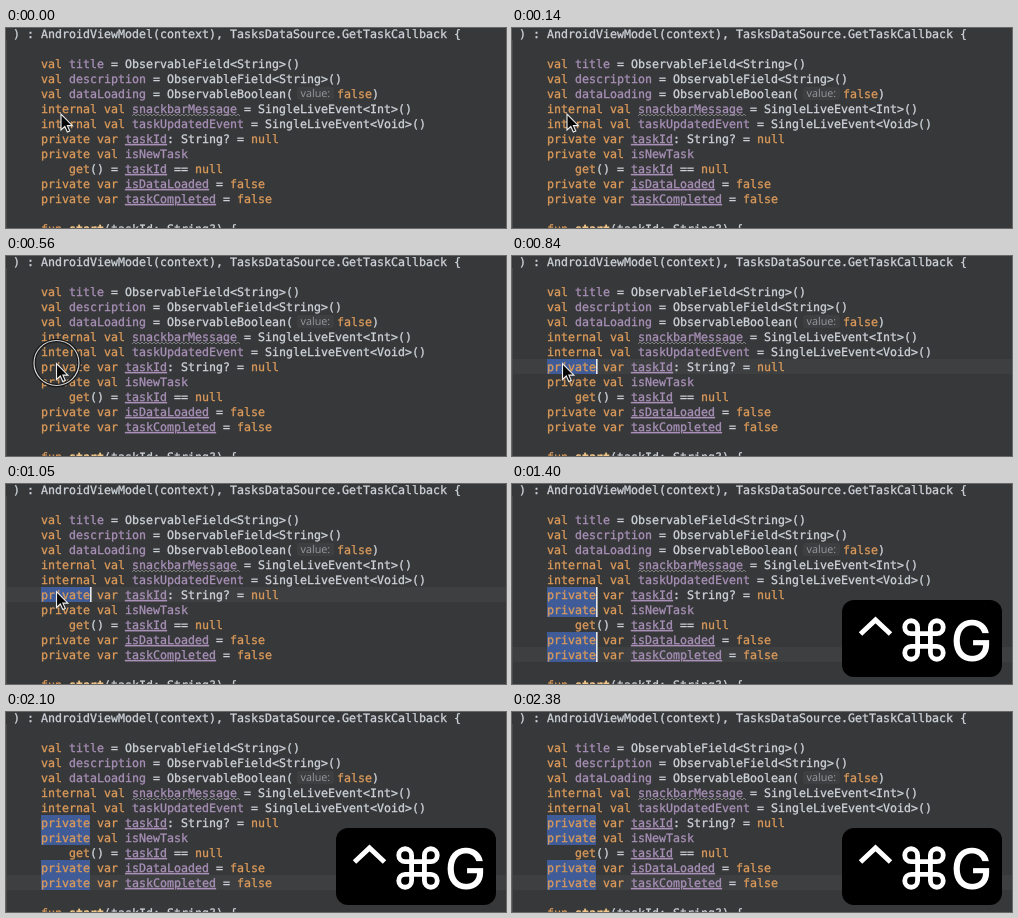
Write an HTML page that moves like this. It is 500x200 px and loops after 2.45 s.

```html
<!DOCTYPE html>
<html lang="en">
<head>
<meta charset="utf-8">
<style>
  html, body { margin: 0; width: 100%; height: 100%; overflow: hidden; background: #373839; }
  svg { display: block; }
  text { white-space: pre; text-rendering: geometricPrecision; }
  #code { font: 11.63px "DejaVu Sans Mono", monospace; color: #cdd3da; fill: currentColor; stroke: currentColor; stroke-width: .3; }
  #code tspan { fill: currentColor; stroke: currentColor; }
  .keyword { color: #db9a5a; }
  .field { color: #a890b8; }
  .mutable { color: #a890b8; text-decoration: underline; }
  .function { color: #f5c98a; font-weight: bold; }
</style>
</head>
<body>
<svg width="500" height="200" viewBox="0 0 500 200">
  <rect width="500" height="200" fill="#373839"/>
  <path d="M.5 12V200" stroke="#484a4b"/>
  <rect id="line" x="1" width="499" height="15" fill="#3e3f40"/>
  <g id="selections"></g>
  <rect x="291" y="59" width="37" height="13" rx="3" fill="#3d3f40"/>
  <text x="294.5" y="69" font-family="Open Sans, sans-serif" font-size="10.8" fill="#96999b">value:</text>
  <g id="code"></g>
  <path id="wave" fill="none" stroke="#8d9092" stroke-width=".8"/>
  <g id="carets" fill="#e8e9ea"></g>
  <g id="ring" fill="none">
    <circle r="22.5" stroke="#161616" stroke-width="3.5"/>
    <circle r="22.5" stroke="#d5d5d5" stroke-width="1.2"/>
  </g>
  <path id="pointer" d="M0 0V16L3.8 12.5L6.3 18L8.8 17L6.4 11.6H11.4Z" fill="#080808" stroke="#eee" stroke-width="1.1"/>
  <g id="keys">
    <rect x="330" y="116" width="160" height="77" rx="12"/>
    <g fill="none" stroke="#fff" stroke-width="4.5">
      <path d="M348.5 150L363.5 136L378.5 150" stroke-width="5"/>
      <path transform="translate(412 156) scale(1.07)" d="M-6-6H-12a6 6 0 1 1 6-6V12a6 6 0 1 1-6-6H12a6 6 0 1 1-6 6V-12a6 6 0 1 1 6 6Z"/>
    </g>
    <text x="438.5" y="177" font-family="Inter, sans-serif" font-size="56" font-weight="500" fill="#fff">G</text>
  </g>
</svg>
<script>
const LOOP = 2450, ROW = 15, COL = 7;
const MOVE_START = 140, MOVE_END = 490, RING_END = 700, SELECT = 700, SHORTCUT = 1260, CARET_OFF = 1930;
const selectedRows = [7, 8, 10, 11];
const lines = [
  ") : AndroidViewModel(context), TasksDataSource.GetTaskCallback {",
  "",
  "    val title = ObservableField<String>()",
  "    val description = ObservableField<String>()",
  "    val dataLoading = ObservableBoolean(",
  "    internal val snackbarMessage = SingleLiveEvent<Int>()",
  "    internal val taskUpdatedEvent = SingleLiveEvent<Void>()",
  "    private var taskId: String? = null",
  "    private val isNewTask",
  "        get() = taskId == null",
  "    private var isDataLoaded = false",
  "    private var taskCompleted = false",
  "",
  "    fun start(taskId: String?) {"
];
const styles = [
  ["keyword", /^(val|var|internal|private|get|null|false|fun)$/],
  ["field", /^(title|description|dataLoading|snackbarMessage|taskUpdatedEvent|isNewTask)$/],
  ["mutable", /^(taskId|isDataLoaded|taskCompleted)$/],
  ["function", /^start$/]
];
const $ = id => document.getElementById(id);
const show = (id, on) => $(id).style.display = on ? "" : "none";
const place = (id, x, y) => $(id).setAttribute("transform", `translate(${x} ${y})`);

function paint(word, row) {
  const style = styles.find(([, pattern]) => pattern.test(word));
  if (!style || (row === 13 && word === "taskId")) return word;
  return `<tspan class="${style[0]}">${word}</tspan>`;
}

function codeLine(line, row, x = 7) {
  const indent = line.search(/\S|$/);
  const words = line.trim().match(/\w+|\W+/g) || [];
  const body = words.map(w => paint(w.replace(/</g, "&lt;").replace(/>/g, "&gt;"), row)).join("");
  return `<text x="${x + indent * COL}" y="${10 + row * ROW}">${body}</text>`;
}

$("code").innerHTML = lines.map((line, row) => codeLine(line, row)).join("") + codeLine("false)", 4, 331);
$("wave").setAttribute("d", "M126 88" + "l2-2l2 2".repeat(27));
const bars = (x, width, fill) => selectedRows.map(row =>
  `<rect x="${x}" y="${row * ROW - 2}" width="${width}" height="15" ${fill}/>`).join("");
$("selections").innerHTML = bars(35, 49, 'fill="#3f5c98"');
$("carets").innerHTML = bars(84, 1.6, "");

function render(t) {
  const p = Math.min(1, Math.max(0, (t - MOVE_START) / (MOVE_END - MOVE_START)));
  const ease = p * p * (3 - 2 * p);
  place("pointer", 55 - 4.5 * ease, 86 + 21.5 * ease);
  place("ring", 50.5, 107);
  const selected = t >= SELECT, all = t >= SHORTCUT;
  show("pointer", !all);
  show("ring", t >= MOVE_END && t < RING_END);
  show("keys", all);
  show("line", selected);
  $("line").setAttribute("y", (all ? 11 : 7) * ROW - 2);
  show("selections", selected);
  show("carets", selected && t < CARET_OFF);
  for (const id of ["selections", "carets"])
    [...$(id).children].forEach((bar, i) => bar.style.display = all || i === 0 ? "" : "none");
}

const start = performance.now();
function tick() {
  render((performance.now() - start) % LOOP);
  requestAnimationFrame(tick);
}
tick();
</script>
</body>
</html>
```
